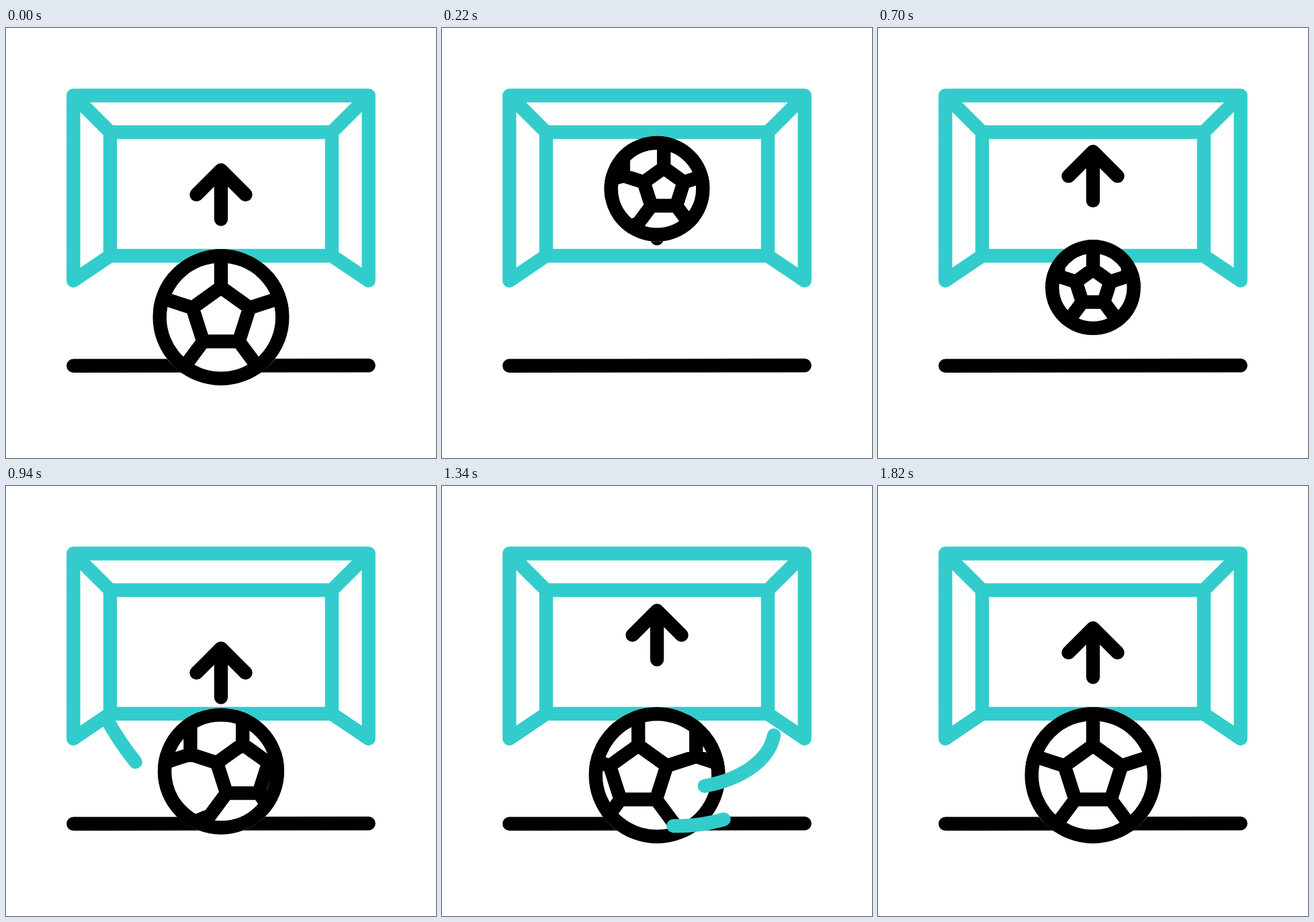
Recreate the animation shown at these times as an HTML page. Size 640 by 640 pixels, loop 2.4 s.

```html
<!DOCTYPE html>
<html lang="en">
<head>
<meta charset="utf-8">
<title>Football and goal</title>
<style>
  html, body { margin: 0; height: 100%; overflow: hidden; background: #fff; }
  svg { display: block; width: 100vw; height: 100vh; }
  .line { fill: none; stroke: #000; stroke-width: 20.4; stroke-linecap: round; stroke-linejoin: round; }
  .teal { stroke: #3cc; }
</style>
</head>
<body>
<svg viewBox="0 0 640 640">
  <clipPath id="clip"><circle class="disc" cx="320"/></clipPath>
  <path class="line teal" d="M100.3 376V100.5H539.7V376L485 339H155L100.3 376M155 155H485V339M155 339V155L100.3 100.5M485 155L539.7 100.5"/>
  <path class="line" d="M100.3 502.8L539.7 502.2"/>
  <path class="line" id="arrow" d="M320 284.5V211.5M283.5 248L320 211.5L356.5 248"/>
  <circle class="disc" cx="320" fill="#fff"/>
  <g clip-path="url(#clip)"><path class="line" id="seams"/></g>
  <circle class="line" id="ring" cx="320"/>
  <path class="line teal" id="low" pathLength="1" d="M149 345C185 412 262 506 347 506C388 507 428 496 462 480"/>
  <path class="line teal" id="high" pathLength="1" d="M300 456Q345 455 388 447C440 438 486 412 494 371"/>
</svg>
<script>
const STEP = 20, LOOP = 2400, LAST = 91;
const TILE = 172; // distance between neighbouring pentagons on the ball
const $ = id => document.getElementById(id);

// Cubic Bezier easing from flat to flat, with free horizontal handles
function ease(x, x1 = 1 / 3, x2 = 2 / 3) {
  let lo = 0, hi = 1, s;
  for (let i = 0; i < 24; i++) {
    s = (lo + hi) / 2;
    const at = 3 * s * (1 - s) ** 2 * x1 + 3 * s * s * (1 - s) * x2 + s ** 3;
    if (at < x) lo = s; else hi = s;
  }
  return s * s * (3 - 2 * s);
}

// Keys: [step, value, handle1, handle2]; handles shape the way into the key
function track(n, keys) {
  if (n <= keys[0][0]) return keys[0][1];
  for (let i = 1; i < keys.length; i++) {
    const [a, from] = keys[i - 1], [b, to, x1, x2] = keys[i];
    if (n < b) return from + (to - from) * ease((n - a) / (b - a), x1, x2);
  }
  return keys[keys.length - 1][1];
}

const arrowKeys = [[0, 0], [15, 35], [30.5, -37], [50.5, 36], [71, -33], [91, 0]];
const radiusKeys = [[0, 101.5], [22, 55.5], [55.5, 101.5]];
const heightKeys = [[0, 430.5], [16, 181.6], [56, 430.5, .3, .085]];
const rollKeys = [[0, 0], [34, TILE, .75, .6], [91, 2 * TILE, .35, .27]];

const outline = [[0, -44.5], [42.5, -14], [26.5, 36], [-26.5, 36], [-42.5, -14], [0, -44.5]];
const right = [
  [[42.5, -14], [86, -28], [86, -115]],
  [[26.5, 36], [54, 73], [86, 86]]
];
const left = right.map(line => line.map(([x, y]) => [-x, y]));
const seamLines = [outline, [[0, -44.5], [0, -115]], ...right, ...left];

function seamPath(cy, scale, roll) {
  let d = "";
  for (let tile = -2; tile <= 1; tile++) {
    const shift = roll % TILE + tile * TILE;
    for (const line of seamLines)
      d += "M" + line.map(([x, y]) =>
        (320 + (x + shift) * scale).toFixed(2) + " " + (cy + y * scale).toFixed(2)).join("L");
  }
  return d;
}

function trail(id, head, tail) {
  const length = head - tail, style = $(id).style;
  style.display = length > .002 ? "" : "none";
  style.strokeDasharray = Math.max(length, 0) + " 3";
  style.strokeDashoffset = -tail;
}

function draw(time) {
  const n = Math.min(LAST, Math.floor(time % LOOP / STEP));
  const r = track(n, radiusKeys), cy = track(n, heightKeys);

  $("arrow").setAttribute("transform", `translate(0 ${track(n, arrowKeys)})`);
  for (const disc of document.querySelectorAll(".disc")) {
    disc.setAttribute("r", r);
    disc.setAttribute("cy", cy);
  }
  $("ring").setAttribute("r", r - 10.2);
  $("ring").setAttribute("cy", cy);
  // The seams shrink a little faster than the ball
  $("seams").setAttribute("d", seamPath(cy, 1 - (101.5 - r) * .013, track(n, rollKeys)));

  trail("low", track(n, [[36, 0], [83, 1, .333, .35]]), track(n, [[49, 0], [86, 1, .333, .35]]));
  trail("high", track(n, [[49, 0], [67, 1]]), track(n, [[57, 0], [80, 1]]));
}

const start = performance.now();
(function tick() {
  draw(performance.now() - start);
  requestAnimationFrame(tick);
})();
</script>
</body>
</html>
```
